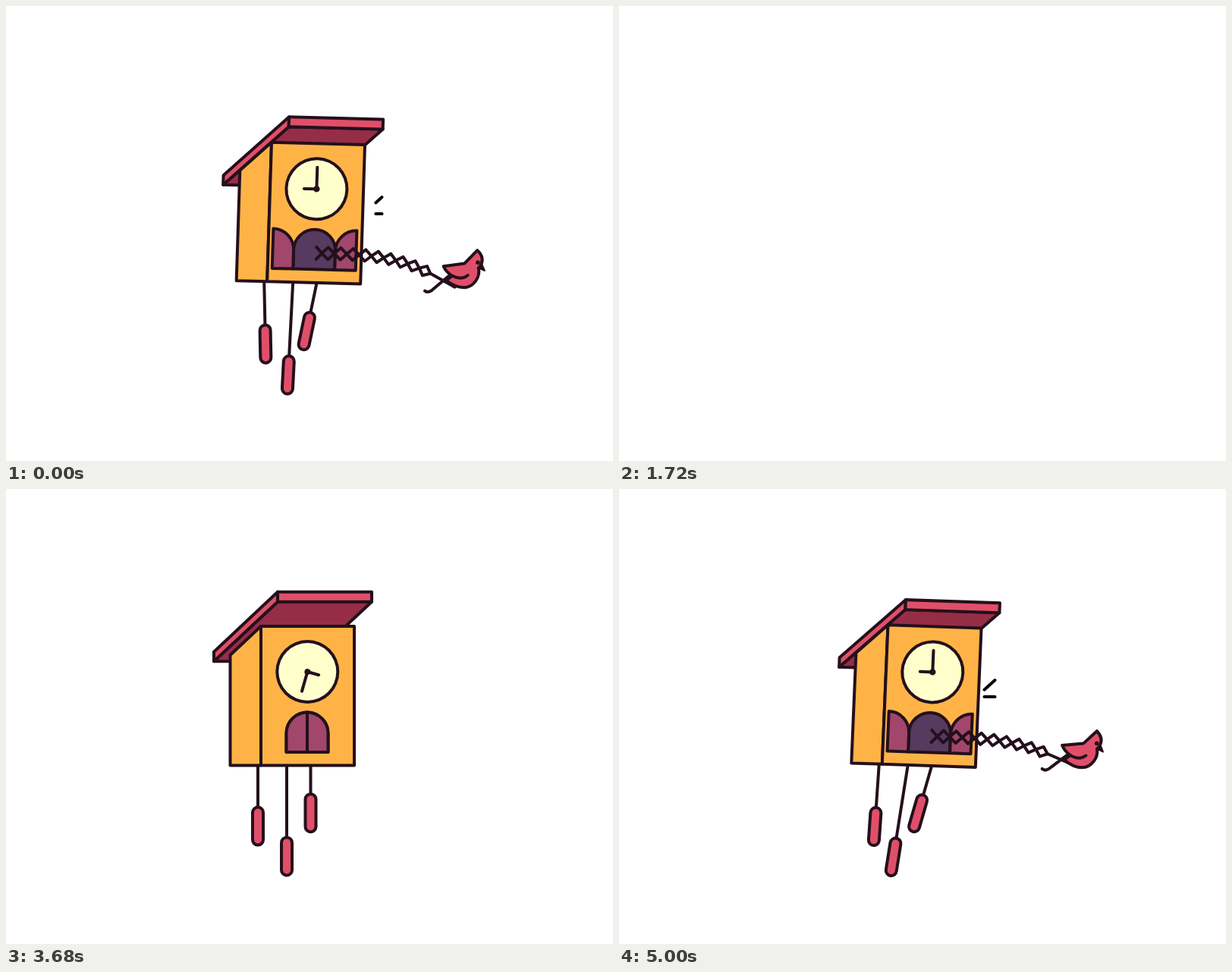
These frames come from a looping animation (800x600 px, 5.04 s). An HTML page with a canvas:

```html
<!DOCTYPE html>
<html lang="en">
<head>
<meta charset="utf-8">
<title>Cuckoo clock</title>
<style>
html, body { margin: 0; width: 100%; height: 100%; overflow: hidden; background: #fff; }
canvas { display: block; width: 800px; height: 600px; }
</style>
</head>
<body>
<canvas id="stage" width="800" height="600"></canvas>
<script>
const ctx = document.getElementById('stage').getContext('2d');
const LOOP = 5040, STEP = 40;
const INK = '#24101c', RED = '#e04f69', MAROON = '#962d46', ORANGE = '#ffb347';
const CREAM = '#ffffcc', PLUM = '#573a5f', DOOR = '#a2466c';

const lerp = (a, b, p) => a + (b - a) * p;
const span = (t, from, to) => Math.min(1, Math.max(0, (t - from) / (to - from)));
const easeOut = p => 1 - (1 - p) ** 3;
const easeInOut = p => (1 - Math.cos(Math.PI * p)) / 2;

// Sway of the whole clock: a nudge left, a swing right, then a damped swing.
function sway(t) {
  if (t < 4560) return 0;
  if (t < 4760) return -0.35 * easeInOut(span(t, 4560, 4760));
  if (t < 5000) return lerp(-0.35, 1, easeInOut(span(t, 4760, 5000)));
  const s = (t - 5000) / 1000;
  return Math.exp(-3.4 * s) * Math.cos(2 * Math.PI * s / 0.48);
}

function paint(fill, stroke = INK) {
  if (fill) { ctx.fillStyle = fill; ctx.fill(); }
  ctx.strokeStyle = stroke;
  ctx.stroke();
}

function poly(fill, ...points) {
  ctx.beginPath();
  points.forEach(([x, y]) => ctx.lineTo(x, y));
  ctx.closePath();
  paint(fill);
}

function line(x1, y1, x2, y2, color = INK) {
  ctx.beginPath();
  ctx.moveTo(x1, y1);
  ctx.lineTo(x2, y2);
  paint(null, color);
}

function shape(d, fill) {
  const path = new Path2D(d);
  if (fill) { ctx.fillStyle = fill; ctx.fill(path); }
  ctx.strokeStyle = INK;
  ctx.stroke(path);
}

function disc(x, y, r, color) {
  if (r <= 0) return;
  ctx.beginPath();
  ctx.arc(x, y, r, 0, 7);
  ctx.fillStyle = color;
  ctx.fill();
}

// Part of a straight stroke, from share a to share b.
function trimmed(x1, y1, x2, y2, a, b) {
  if (b <= a) return;
  line(lerp(x1, x2, a), lerp(y1, y2, a), lerp(x1, x2, b), lerp(y1, y2, b), '#000');
}

function drawWeight(t, x, length, start, lead) {
  const s = (t - start) / 1000;
  if (s <= 0) return;
  const drop = 1 - Math.exp(-9.5 * s) * Math.cos(15.7 * s);
  const bottom = 364 + length * drop, top = bottom - 50;
  ctx.save();
  ctx.translate(x, 364);
  ctx.rotate(14 * sway(t + lead) * Math.PI / 180);
  ctx.translate(-x, -364);
  if (top > 364) line(x, 364, x, top);
  ctx.beginPath();
  ctx.roundRect(x - 7, top, 14, 50, 7);
  paint(RED);
  ctx.restore();
}

function drawRoof(t) {
  if (t < 2550) return;
  const depth = easeOut(span(t, 2540, 3040));
  let lift = lerp(-34, -28, easeInOut(span(t, 2600, 3000)));
  if (t > 3240) lift = lerp(-28, -37, easeInOut(span(t, 3240, 3480)));
  if (t > 3480) lift = lerp(-37, 0, span(t, 3480, 3720) ** 2);
  const x = 274 + 84 * depth, low = 226 + lift, high = low - 79 * depth;
  poly(MAROON, [x, high + 13], [x + 124, high + 13], [398, low + 12.5], [274, low + 12.5]);
  poly(RED, [x, high], [x, high + 13], [274, low + 12.5], [274, low]);
  poly(RED, [x, high], [x + 124, high], [x + 124, high + 13], [x, high + 13]);
}

function drawBox(t) {
  const side = easeOut(span(t, 2560, 3060));
  if (side > 0) {
    const x = 336 - 40.5 * side;
    poly(ORANGE, [x, 181 + 38 * side], [336, 181], [336, 364.5], [x, 364.5]);
  }
  const top = lerp(364, 181, easeOut(span(t, 2040, 2520)));
  const bulge = 6 * Math.sin(Math.PI * span(t, 2400, 2800));
  ctx.beginPath();
  ctx.moveTo(336, 364.5);
  ctx.lineTo(336, top);
  ctx.quadraticCurveTo(397, top - 2 * bulge, 459, top);
  ctx.lineTo(459, 364.5);
  ctx.closePath();
  paint(ORANGE);
}

function drawDial(t) {
  const seen = span(t, 2440, 2560);
  if (!seen) return;
  const grow = easeInOut(span(t, 3190, 3560));
  const y = grow ? lerp(199, 241, grow) : lerp(218, 199, easeOut(span(t, 2560, 3060)));
  disc(397.3, y, lerp(5.3 * seen, 42, grow), INK);
  disc(397.3, y, lerp(-5, 38, grow), CREAM);
  const reach = easeOut(span(t, 3560, 3760));
  if (!reach) return;
  ctx.save();
  ctx.translate(397.3, 241);
  ctx.rotate(-220 * (1 - span(t, 3560, 4440)) ** 2 * Math.PI / 180);
  line(0, 0, 0, -28.5 * reach);
  line(0, 0, -16.5 * reach, 0);
  disc(0, 0, 4.2 * reach, INK);
  ctx.restore();
}

function drawLeaf(hinge, width) {
  const edge = hinge + width;
  ctx.beginPath();
  ctx.moveTo(hinge, 347);
  ctx.lineTo(hinge, 322);
  ctx.bezierCurveTo(hinge, 307, hinge + width * 0.45, 294.5, edge, 294.5);
  ctx.lineTo(edge, 347);
  ctx.closePath();
  paint(DOOR);
}

function drawWindow(t) {
  const rise = easeOut(span(t, 2560, 3060));
  if (!rise) return;
  const curve = 27.5 * rise, top = 347 - 52.5 * rise;
  ctx.beginPath();
  ctx.moveTo(369.5, 347);
  ctx.lineTo(369.5, top + curve);
  ctx.ellipse(397, top + curve, 27.5, curve, 0, Math.PI, 2 * Math.PI);
  ctx.lineTo(424.5, 347);
  ctx.closePath();
  paint(PLUM);
  if (t < 3000) return;
  const shut = easeInOut(span(t, 3250, 3560)) - 2 * easeInOut(span(t, 4790, 4930));
  drawLeaf(369.5, 27.5 * shut);
  drawLeaf(424.5, -27.5 * shut);
}

function drawBird(x, y, angle, size) {
  ctx.save();
  ctx.translate(x, y);
  ctx.rotate(angle);
  ctx.scale(size, size);
  ctx.translate(-559, -347);
  shape('M563 336 L551 365 Q548 371 543 370');
  shape('M550 330 L573 314 L580 291 Q594 295 593 308 L592 311 C600 320 598 336 588 342 ' +
        'Q577 348 562 345 L566 336 Q556 335 550 330 Z', RED);
  shape('M566 336 Q580 336 584 326');
  ctx.lineWidth = 2;
  shape('M593 304 L601 310.5 L592 311 Z', INK);
  disc(588, 305, 2.8, INK);
  ctx.restore();
}

// Scissor arm whose slope grows towards the bird.
function drawArm(t) {
  const out = easeOut(span(t, 4830, 4970));
  if (!out) return;
  const links = 9, lag = sway(t - 20);
  const pitch = lerp(1, 14.7 + 1.8 * lag, out);
  const bend = (20 + 18 * sway(t - 150)) * Math.PI / 180;
  let x = 407, y = 325.5;
  line(x - 7.5, y - 8, x, y);
  line(x - 7.5, y + 8, x, y);
  for (let k = 0; k < links; k++) {
    const a = bend * ((k + 0.5) / links) ** 2;
    const half = 8 - 0.15 * k;
    ctx.save();
    ctx.translate(x, y);
    ctx.rotate(a);
    poly(null, [0, 0], [pitch / 2, -half], [pitch, 0], [pitch / 2, half]);
    ctx.restore();
    x += pitch * Math.cos(a);
    y += pitch * Math.sin(a);
  }
  const dx = Math.cos(bend), dy = Math.sin(bend);
  line(x, y, x + 37 * dx * out, y + 37 * dy * out);
  drawBird(x + 20 * dx * out, y + 20 * dy * out, (35 * lag - 6) * Math.PI / 180, lerp(0.35, 1, out));
}

function drawAccents(t) {
  const grow = span(t, 2440, 2560), fade = span(t, 2600, 2760);
  for (const x of [331, 457]) trimmed(x, 136, x + 40.5, 97, fade, grow);

  const tick = span(t, 4680, 4760), tickFade = span(t, 4780, 4880);
  trimmed(247, 266, 231, 252, tickFade, tick);
  trimmed(247, 274, 231, 274, tickFade, tick);

  const tock = span(t, 4890, 4970), tockFade = span(t, 4990, 5096);
  trimmed(480, 266, 495.5, 252, tockFade, tock);
  trimmed(480, 274, 495.5, 274, tockFade, tock);
}

function draw(t) {
  ctx.setTransform(1, 0, 0, 1, 0, 0);
  ctx.fillStyle = '#fff';
  ctx.fillRect(0, 0, 800, 600);
  if (t >= 1720 && t < 2040) return;
  if (t < 1720) t += LOOP;
  ctx.lineWidth = 4;
  ctx.lineCap = ctx.lineJoin = 'round';

  const p = sway(t), skewY = 0.034 * p, skewX = 0.042 * p;
  ctx.setTransform(1, skewY, -skewX, 1, 622 * skewX, -385 * skewY);
  drawWeight(t, 332, 108, 3280, 108);
  drawWeight(t, 370, 148, 3260, 71);
  drawWeight(t, 401.5, 90.5, 3300, 5);
  drawRoof(t);
  drawBox(t);
  drawDial(t);
  drawWindow(t);
  drawArm(t);
  ctx.setTransform(1, 0, 0, 1, 0, 0);
  drawAccents(t);
}

const begin = performance.now();
function tick() {
  const t = (performance.now() - begin) % LOOP;
  draw(Math.floor(t / STEP) * STEP);
  requestAnimationFrame(tick);
}
tick();
</script>
</body>
</html>
```
